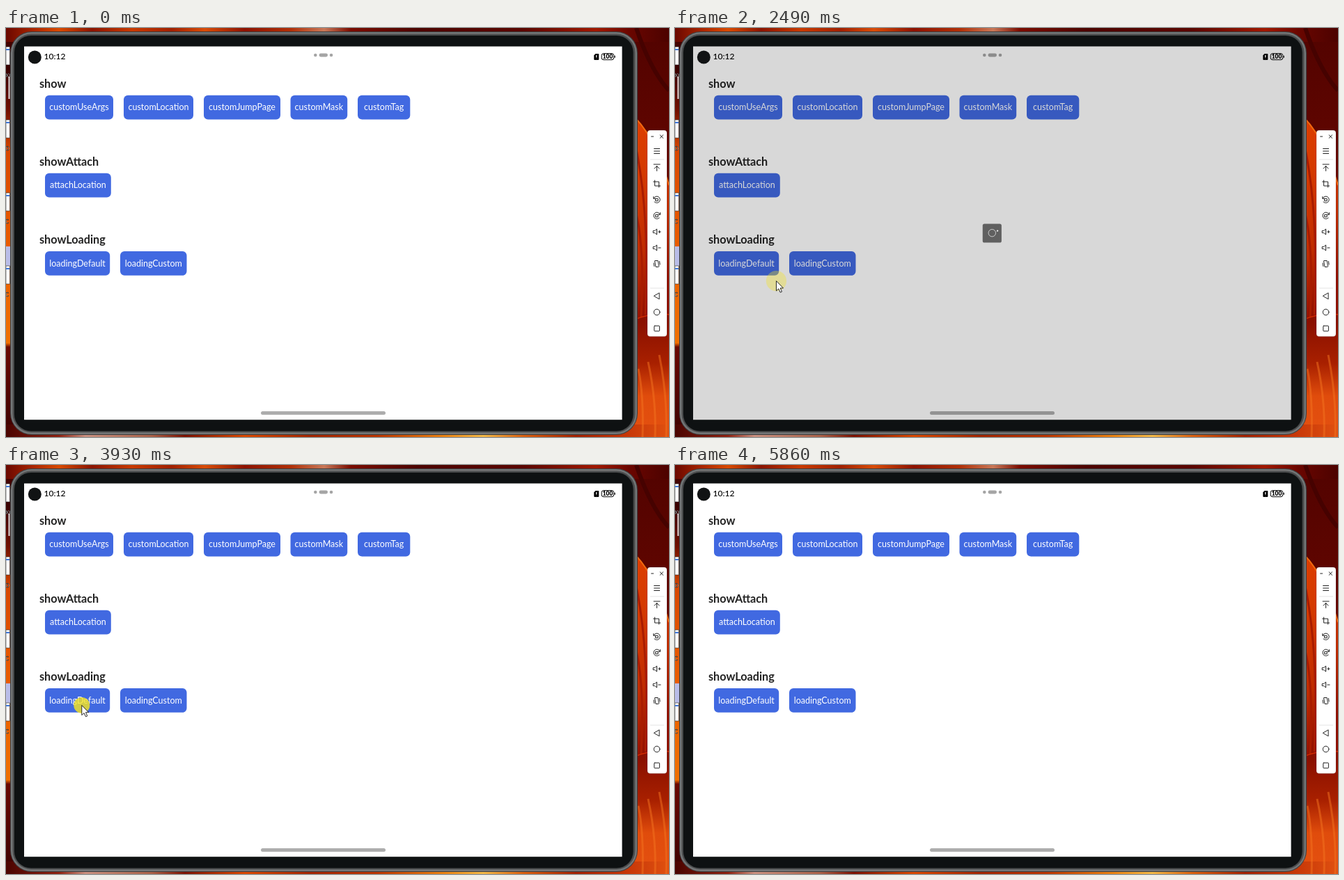
These frames come from a looping animation (952 by 588 pixels, 5.9 s). An HTML page:

```html
<!DOCTYPE html>
<html lang="en">
<head>
<meta charset="utf-8">
<title>Loading dialog demo</title>
<style>
html, body { margin: 0; width: 100%; height: 100%; overflow: hidden; background: #4a0500; }
svg { position: absolute; left: 0; top: 0; display: block; }
text { font-family: Lato, "Open Sans", sans-serif; }
.head { font-size: 16.2px; font-weight: 700; fill: #232323; }
.label { font-size: 12.5px; fill: #fff; text-anchor: middle; }
.icon { fill: none; stroke: #222; stroke-width: 1; stroke-linecap: round; stroke-linejoin: round; }
</style>
</head>
<body>
<svg id="stage" width="952" height="588" viewBox="0 0 952 588">
  <defs>
    <linearGradient id="top">
      <stop offset="0" stop-color="#6a0800"/><stop offset=".04" stop-color="#a82400"/>
      <stop offset=".08" stop-color="#d84a00"/><stop offset=".13" stop-color="#8a1400"/>
      <stop offset=".19" stop-color="#c83a00"/><stop offset=".25" stop-color="#a02000"/>
      <stop offset=".3" stop-color="#d84c08"/><stop offset=".36" stop-color="#8c1200"/>
      <stop offset=".43" stop-color="#b03008"/><stop offset=".48" stop-color="#c87858"/>
      <stop offset=".52" stop-color="#7a0c00"/><stop offset=".62" stop-color="#4c0400"/>
      <stop offset=".78" stop-color="#5a0600"/><stop offset=".89" stop-color="#a01800"/>
      <stop offset=".94" stop-color="#6a0600"/><stop offset="1" stop-color="#4c0200"/>
    </linearGradient>
    <linearGradient id="bottom">
      <stop offset="0" stop-color="#4a0400"/><stop offset=".08" stop-color="#8c2010"/>
      <stop offset=".12" stop-color="#c89080"/><stop offset=".22" stop-color="#a86048"/>
      <stop offset=".27" stop-color="#7a1000"/><stop offset=".36" stop-color="#d84800"/>
      <stop offset=".46" stop-color="#a02400"/><stop offset=".56" stop-color="#b83400"/>
      <stop offset=".66" stop-color="#e88010"/><stop offset=".72" stop-color="#f0b848"/>
      <stop offset=".78" stop-color="#d86010"/><stop offset=".86" stop-color="#a02000"/>
      <stop offset=".94" stop-color="#c83808"/><stop offset="1" stop-color="#e05010"/>
    </linearGradient>
    <linearGradient id="left" x2="0" y2="1">
      <stop offset="0" stop-color="#4a0300"/><stop offset=".1" stop-color="#3a0200"/>
      <stop offset=".2" stop-color="#701000"/><stop offset=".3" stop-color="#d84800"/>
      <stop offset=".5" stop-color="#e85a00"/><stop offset=".77" stop-color="#f07000"/>
      <stop offset=".78" stop-color="#6a0800"/><stop offset="1" stop-color="#3c0200"/>
    </linearGradient>
    <linearGradient id="right" x2="0" y2="1">
      <stop offset="0" stop-color="#520300"/><stop offset=".25" stop-color="#5e0500"/>
      <stop offset=".72" stop-color="#8a1000"/><stop offset=".82" stop-color="#a82000"/>
      <stop offset=".9" stop-color="#e04c0c"/><stop offset="1" stop-color="#e45010"/>
    </linearGradient>
    <linearGradient id="petal" x2=".3" y2="1">
      <stop offset="0" stop-color="#e04000"/><stop offset=".35" stop-color="#d43a00"/>
      <stop offset=".7" stop-color="#c02c00"/><stop offset="1" stop-color="#900f00"/>
    </linearGradient>
    <clipPath id="edge"><rect width="6" height="588"/></clipPath>
  </defs>

  <!-- wallpaper -->
  <rect x="880" width="72" height="588" fill="url(#right)"/>
  <rect width="40" height="588" fill="url(#left)"/>
  <rect width="952" height="20" fill="url(#top)"/>
  <rect y="570" width="952" height="18" fill="url(#bottom)"/>
  <path d="M896 122C922 144 940 184 952 226V412C934 408 916 415 896 420Z" fill="url(#petal)"/>
  <g fill="none">
    <path d="M896 122C922 144 940 184 952 226" stroke="#f06a10" stroke-width="2"/>
    <path d="M900 250Q918 300 912 415M902 160Q925 260 918 412" stroke="#a81c00" stroke-width="3"/>
    <path d="M900 420Q930 408 952 412" stroke="#d02a00" stroke-width="1.5"/>
    <path d="M914 588Q916 530 908 490M932 588Q934 535 922 480M948 588Q950 530 938 470" stroke="#f47420" stroke-width="3" stroke-opacity=".5"/>
    <path d="M905 0Q925 60 952 90" stroke="#460200" stroke-width="6"/>
  </g>
  <g id="desk" clip-path="url(#edge)"></g>

  <!-- tablet -->
  <rect x="6" y="5" width="901" height="580" rx="31" fill="#3c3e3f"/>
  <rect x="8.5" y="7.5" width="896" height="575" rx="28.5" fill="none" stroke="#747677" stroke-width="3"/>
  <rect x="10.5" y="9.5" width="892" height="571" rx="26" fill="none" stroke="#4c4e4f" stroke-width="2"/>
  <rect x="12" y="11" width="888.5" height="568.5" rx="24" fill="#0e1112"/>
  <rect x="26" y="26.5" width="858.6" height="536.7" fill="#fff"/>
  <g id="page"></g>
  <rect id="mask" x="26" y="26.5" width="858.6" height="536.7"/>

  <!-- system bars -->
  <circle cx="41.3" cy="42" r="9.5" fill="#111314"/>
  <text x="54.5" y="45.2" font-size="12" font-weight="500">10:12</text>
  <g id="dots"><circle cx="444.3" cy="39" r="2.3"/><rect x="449.5" y="36.6" width="12.5" height="4.8" rx="2.4"/><circle cx="467" cy="39" r="2.3"/></g>
  <rect id="home" x="366" y="551" width="179" height="5" rx="2.5"/>
  <path d="M846.5 37H850.5Q851.3 37 851.3 38V45Q851.3 46 850.3 46H845.3Q844.3 46 844.3 45V39.2Z"/>
  <path d="M847.8 39V42.5M847.8 44V44.3" stroke="#fff" stroke-width="1.2"/>
  <rect x="855.2" y="36.7" width="17.6" height="9" rx="2.8" fill="none" stroke="#000"/>
  <path d="M874.2 39.7V42.7" stroke="#000" stroke-width="1.2"/>
  <text x="864" y="44.2" font-size="8.3" font-weight="900" text-anchor="middle">100</text>

  <g id="dialog">
    <rect x="-41" y="-41" width="82" height="82" rx="8" fill="#606060"/>
    <g id="comet" fill="#fff"></g>
    <circle id="ring" r="15.8" fill="none" stroke="#fff" stroke-width="2"/>
  </g>

  <!-- side toolbar -->
  <rect x="921" y="147" width="28" height="296.5" rx="4" fill="#fff" stroke="#000" stroke-opacity=".2" stroke-width=".6"/>
  <rect id="hover" x="925" y="376" width="19" height="18" rx="4" fill="#dcdcdc"/>
  <path d="M925 189H945M925 374H945" stroke="#e4e4e4"/>
  <g id="tools" class="icon"></g>

  <circle id="pulse" fill="#f7e61e"/>
  <path id="cursor" d="M0 0V14.2L3.3 11.2L5.7 16.4L8 15.4L5.7 10.3H10Z" fill="#fff" stroke="#111" stroke-width=".9" stroke-linejoin="round"/>
</svg>
<script>
const LOOP = 5900;
const $ = id => document.getElementById(id);

function add(parent, tag, attrs, text) {
  const el = document.createElementNS("http://www.w3.org/2000/svg", tag);
  for (const k in attrs) el.setAttribute(k, attrs[k]);
  if (text) el.textContent = text;
  return parent.appendChild(el);
}
const set = (el, attrs) => { for (const k in attrs) el.setAttribute(k, attrs[k]); };

// page: title baseline, then [label, left, right]
const sections = [
  ["show", 86, [["customUseArgs", 56, 154], ["customLocation", 169, 269], ["customJumpPage", 284, 394], ["customMask", 408.5, 490.2], ["customTag", 505, 580.3]]],
  ["showAttach", 198, [["attachLocation", 56, 150.8]]],
  ["showLoading", 310.3, [["loadingDefault", 56, 149.2], ["loadingCustom", 164, 259.5]]]
];
for (const [title, y, buttons] of sections) {
  add($("page"), "text", { class: "head", x: 48, y }, title);
  for (const [label, x, end] of buttons) {
    add($("page"), "rect", { x, y: y + 10.8, width: end - x, height: 34.6, rx: 6, fill: "#4169e1" });
    add($("page"), "text", { class: "label", x: (x + end) / 2, y: y + 32.2 }, label);
  }
}

// desktop icons cut off by the tablet
add($("desk"), "rect", { y: 314, width: 6, height: 28, fill: "#b9bde8" });
for (const y of [27, 132, 237, 342]) {
  add($("desk"), "rect", { y, width: 5.5, height: 26, fill: "#fff", stroke: "#222", "stroke-width": .6 });
  add($("desk"), "rect", { y: y + 3, width: 5, height: 2, fill: "#3f78d8" });
  add($("desk"), "text", { x: -1, y: y + 44, fill: "#fff", stroke: "#000", "stroke-width": .4, "font-size": 11 }, y < 100 ? "xo" : y < 200 ? "o" : "c");
}
add($("desk"), "rect", { x: 3.5, y: 70, width: 2, height: 32, fill: "#ddd" });

// toolbar icons: [centre y, path]
const speaker = "M-5-1.5H-3L0-4V4L-3 1.5H-5Z";
const icons = [
  [156, "M-8 0H-5M4.5-2.2L9 2.3M9-2.2L4.5 2.3"],
  [177, "M-4-3.5H4M-4 0H4M-4 3.5H4"],
  [200.5, "M-4.5-4.5H4.5M0 5V-2M-3.5 1.5L0-2L3.5 1.5"],
  [224, "M-3-5V3H5M-5-3H3V5"],
  [247, "M-4.5-2A4.7 4.7 0 1 1-3.5 3M-4.8-4.5V-1.8H-2M-1.6-1.6H1.6V1.6H-1.6Z"],
  [270, "M4.5-2A4.7 4.7 0 1 0 3.5 3M4.8-4.5V-1.8H2M-1.6-1.6H1.6V1.6H-1.6Z"],
  [293, speaker + "M2.2 0H5.4M3.8-1.6V1.6"],
  [316, speaker + "M2.2 0H5.4"],
  [339, "M-2.5-4.5H1.5L3 3.5Q3 4.5 2 4.5H-1.5L-3-3.5ZM-4.5-1L-3.8 3.5M4.5 1L3.8-3.5"],
  [385.5, "M3.5-4.3V4.3L-4 0Z"],
  [408.5, "M4.3 0A4.3 4.3 0 1 1-4.3 0A4.3 4.3 0 1 1 4.3 0Z"],
  [432, "M-3-3.8H3Q3.8-3.8 3.8-3V3Q3.8 3.8 3 3.8H-3Q-3.8 3.8-3.8 3V-3Q-3.8-3.8-3-3.8Z"]
];
for (const [y, d] of icons) add($("tools"), "path", { d, transform: `translate(934.6 ${y})` });

const TAIL = 16;
const beads = Array.from({ length: TAIL }, () => add($("comet"), "ellipse", {}));

// motion tables
const shows = [[920, 1450], [1800, 2150], [2400, 2960], [3290, 3690], [4000, 5010]];
const growth = [[0, 0], [50, .16], [110, .41], [250, .92], [330, 1]];
const OPEN = 330, CLOSE = 160, TURN = 640;
const clicks = [810, 1380, 1730, 2090, 2330, 2890, 3210, 3620, 3930, 4740];
const path = [
  [150, 657, 588], [280, 520, 535], [420, 270, 430], [540, 135, 358], [640, 107, 344], [880, 107, 344],
  [1170, 192.5, 398], [1300, 188, 402], [1480, 186, 402], [1700, 140, 348], [1820, 141, 349],
  [1910, 151, 380], [2010, 153, 400], [2160, 153, 400], [2300, 140, 346], [2430, 142, 348],
  [2650, 154.5, 404.5], [2980, 154.5, 404.5], [3180, 102, 345], [3290, 102, 346], [3340, 102, 357],
  [3500, 118, 400], [3700, 120, 400], [3880, 108, 345], [4010, 110, 346], [4120, 300, 372],
  [4360, 887, 382], [4480, 925, 380], [4600, 934, 379], [5010, 934, 379], [5200, 940, 430],
  [5420, 934, 545], [5570, 929, 576], [5700, 930, 583], [5850, 931, 589]
];

const clamp = (v, a = 0, b = 1) => Math.min(b, Math.max(a, v));

function sample(table, t) {
  const i = table.findIndex(row => row[0] > t);
  if (i === 0) return table[0].slice(1);
  if (i < 0) return table[table.length - 1].slice(1);
  const a = table[i - 1], b = table[i], k = (t - a[0]) / (b[0] - a[0]);
  return a.slice(1).map((v, j) => v + (b[j + 1] - v) * k);
}

function drawSpinner(turn) {
  const a = turn * 2 * Math.PI;
  const bob = -Math.cos(a) - 1.4 * Math.sin(a);
  $("ring").setAttribute("cy", bob);
  beads.forEach((bead, i) => {
    const q = a - i * .055;
    const u = 26 * Math.cos(q), v = -4 * Math.sin(q);
    const x = .91 * u + .41 * v, y = -.41 * u + .91 * v;
    const hidden = Math.sin(q) > .02 && Math.hypot(x, y - bob) < 16;
    const fade = 1 - i / TAIL, r = 1.5 + 1.2 * fade;
    set(bead, { cx: x, cy: y, rx: r * 1.3, ry: r, opacity: hidden ? 0 : i ? .22 * fade * fade : .95 });
  });
}

function draw(t) {
  const show = shows.find(([a, b]) => t >= a && t < b + CLOSE);
  let s = 0, settled = 0;
  if (show) {
    const [start, end] = show;
    s = t < end ? sample(growth, t - start)[0] : 1 - (t - end) / CLOSE;
    drawSpinner(Math.max(0, Math.min(t, end) - start - OPEN) / TURN);
    settled = t < end ? clamp((t - start - OPEN) / 60) : 0;
  }
  $("mask").setAttribute("opacity", .46 * s);
  set($("dialog"), { transform: `translate(455.3 295) scale(${s})`, opacity: s > 0 ? 1 : 0 });

  const dim = clamp((s - .5) / .42);
  $("home").setAttribute("opacity", .32 - .3 * dim + .1 * settled);
  $("dots").setAttribute("opacity", .35 - .14 * dim);

  const [x, y] = sample(path, t);
  set($("cursor"), { transform: `translate(${x} ${y})`, opacity: t >= 160 && t < 5850 ? 1 : 0 });
  $("hover").setAttribute("opacity", Math.abs(x - 934) < 11 && Math.abs(y - 384) < 11 ? 1 : 0);

  const click = clicks.find(c => t >= c && t < c + 200);
  const out = click === undefined ? 1 : clamp((t - click - 110) / 90);
  set($("pulse"), { cx: x, cy: y, r: 11.5 + 5.5 * out, opacity: .8 * (1 - out) });
}

const begin = performance.now();
function tick() {
  draw((performance.now() - begin) % LOOP);
  requestAnimationFrame(tick);
}
tick();
</script>
</body>
</html>
```
